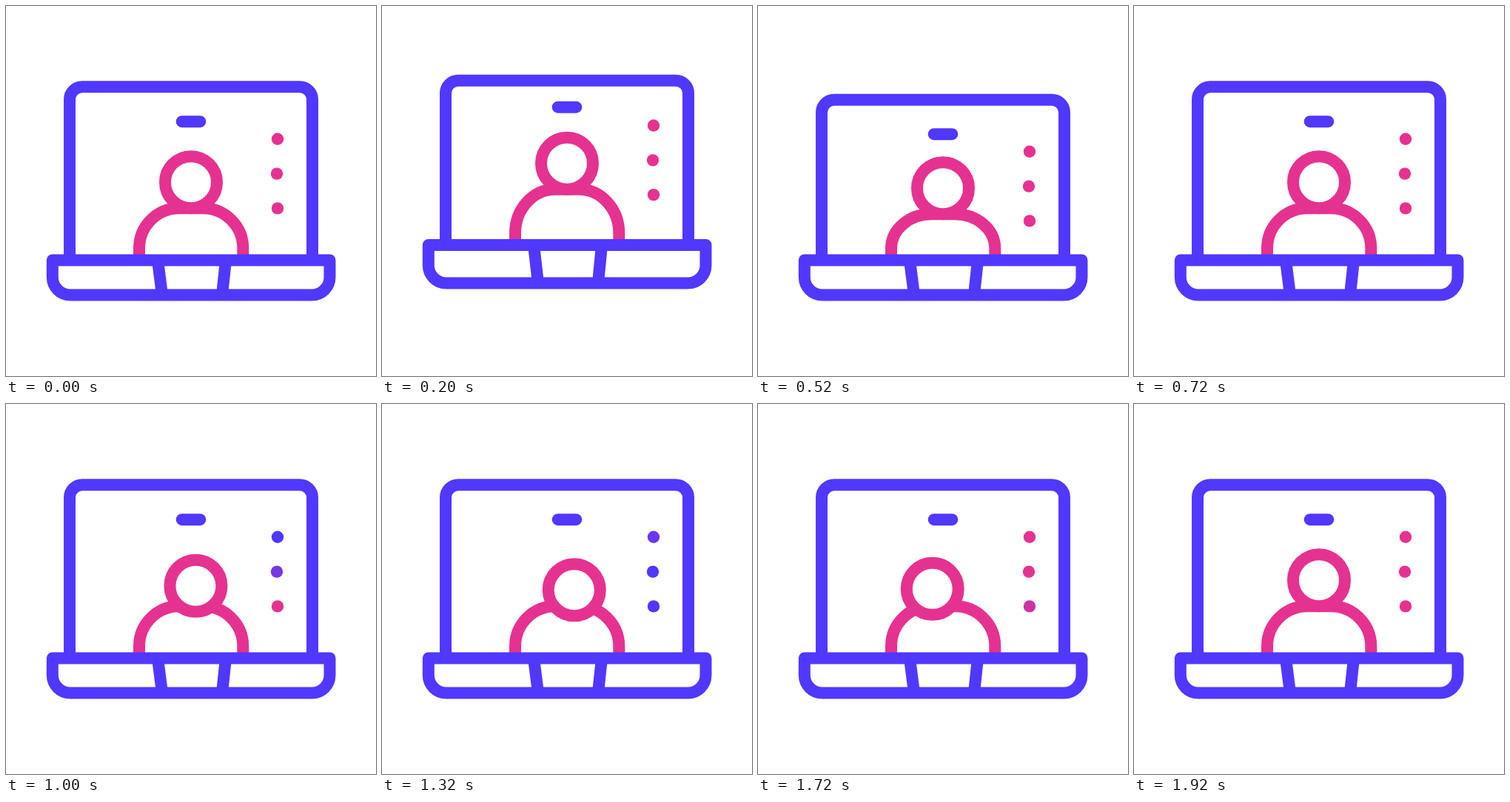
An HTML page that plays this animation: 500 by 500 pixels, repeating every 2 s.

```html
<!DOCTYPE html>
<html>
<head>
<meta charset="utf-8">
<style>
  html, body { margin: 0; width: 100%; height: 100%; overflow: hidden; background: #fff; }
  svg { display: block; width: 100vw; height: 100vh; }
  path, #head { stroke-width: 16; stroke-linejoin: round; fill: none; }
  .blue { stroke: #5138ff; }
  .pink { stroke: #e53291; }
</style>
</head>
<body>
<svg viewBox="0 0 500 500">
  <path id="body" class="pink"/>
  <circle id="head" class="pink" r="35" style="fill:#fff"/>
  <path id="screen" class="blue"/>
  <path id="camera" class="blue" stroke-linecap="round"/>
  <path id="base" class="blue"/>
  <circle class="dot" cx="367" r="8.2"/>
  <circle class="dot" cx="366" r="8.2"/>
  <circle class="dot" cx="367" r="8.2"/>
</svg>
<script>
const LOOP = 2000, STEP = 40;
const BLUE = [81, 56, 255], PINK = [229, 50, 145];
const el = id => document.getElementById(id);
const dots = document.querySelectorAll('.dot');

const ramp = (t, from, to) => Math.min(1, Math.max(0, (t - from) / (to - from)));
const ease = (t, from, to) => {
  const u = ramp(t, from, to);
  return u * u * (3 - 2 * u);
};

// Jump up to `rise`, land at `squash`, settle at zero
const jump = (t, rise, squash) =>
  rise * ease(t, 80, 320) + (squash - rise) * ease(t, 320, 520) - squash * ease(t, 520, 680);

// Look right, then left, then back to the middle
const look = (t, right, left) =>
  right * ease(t, 800, 1160) + (left - right) * ease(t, 1280, 1600) - left * ease(t, 1640, 1920);

function draw(t) {
  const top = 109.3 + jump(t, -17.3, 17.5);
  const hinge = 343.5 + jump(t, -41, 0);
  const bottom = 390.5 + jump(t, -32, 0);
  const camera = 156.2 + jump(t, -39, 17);
  const person = jump(t, -51, 8);
  const neck = 273.3 + person;
  const arm = hinge - 16;

  el('screen').setAttribute('d',
    `M86 ${hinge}V${top + 17}a17 17 0 0 1 17-17H397a17 17 0 0 1 17 17V${hinge}`);
  el('camera').setAttribute('d', `M237.7 ${camera}H262.3`);
  el('body').setAttribute('d',
    `M180 ${hinge}V${arm}A54 ${arm - neck} 0 0 1 234 ${neck}H266.3A54 ${arm - neck} 0 0 1 320.3 ${arm}V${hinge}`);
  el('base').setAttribute('d',
    `M62.8 ${hinge}H437.5V${bottom - 24}a24 24 0 0 1-24 24H86.8a24 24 0 0 1-24-24Z` +
    `M205 ${hinge}L211 ${bottom}M297 ${hinge}L292 ${bottom}`);
  el('head').setAttribute('cx', 250 + look(t, 11, -17.8));
  el('head').setAttribute('cy', 238.2 + person + look(t, 13, 14.5));

  // Colour runs from the lowest dot to the highest
  dots.forEach((dot, i) => {
    const wait = 120 * (2 - i);
    const on = ramp(t, 1000 - 120 * i * 0 - wait, 1160 - wait);
    const off = ramp(t, 1520 - wait, 1760 - wait);
    const mix = on - off;
    dot.setAttribute('cy', 179.8 + 46.8 * i + jump(t, -36.5, 17));
    dot.setAttribute('fill', `rgb(${PINK.map((c, k) => Math.round(c + (BLUE[k] - c) * mix))})`);
  });
}

const start = performance.now();
function frame() {
  const t = (performance.now() - start) % LOOP;
  draw(Math.floor(t / STEP) * STEP);
  requestAnimationFrame(frame);
}
frame();
</script>
</body>
</html>
```
